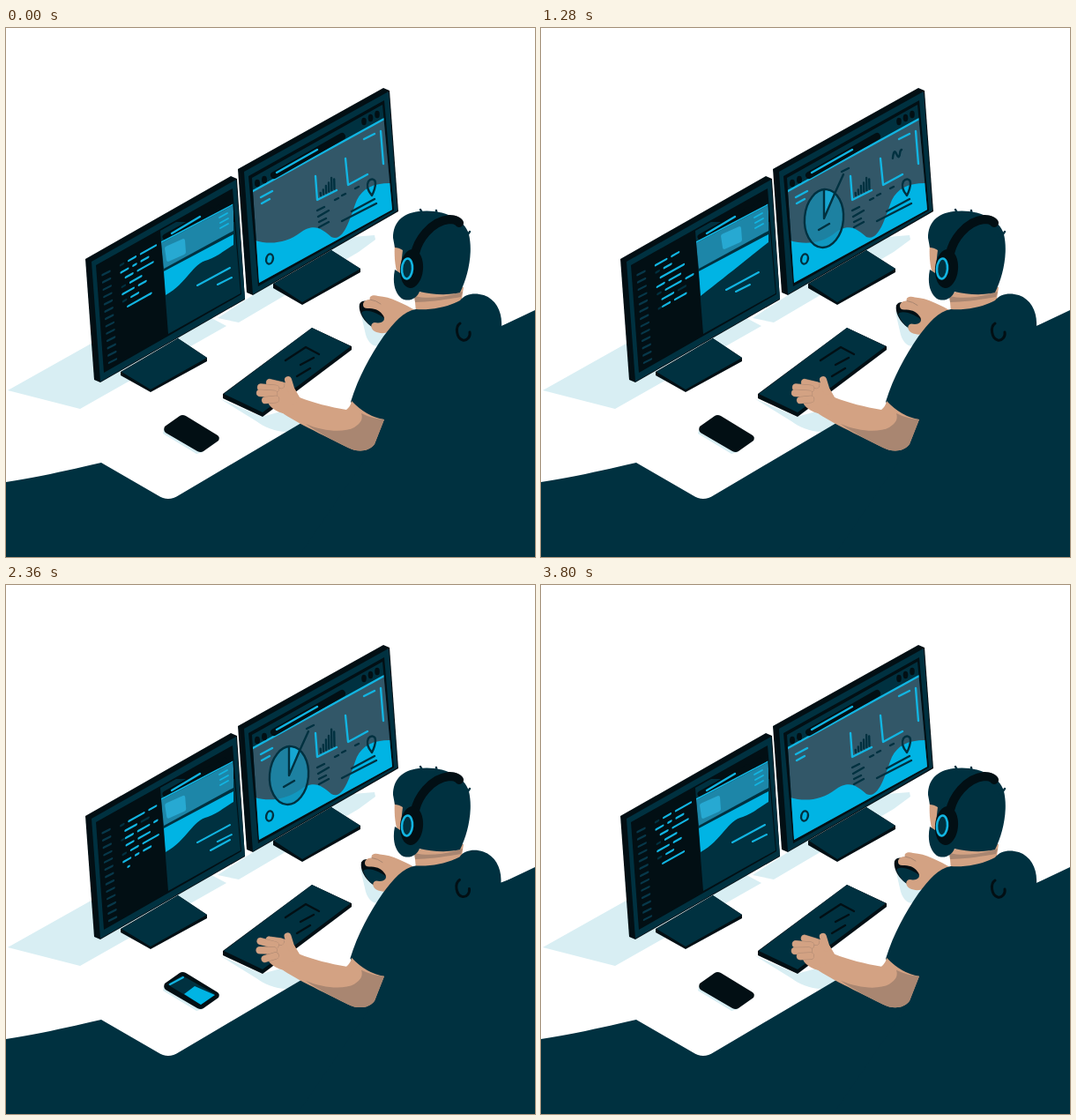
Animation of 600 by 600 pixels, one loop 3840 ms. Source, as an HTML page:

```html
<!DOCTYPE html>
<html lang="en">
<head>
<meta charset="utf-8">
<title>Working at two screens</title>
<style>
html, body { margin: 0; width: 100%; height: 100%; overflow: hidden; background: #fff; }
svg { display: block; width: 100vw; height: 100vh; }
.navy { fill: #003140; }
.ink { fill: #020f14; }
.cyan { fill: #00b4e4; }
.shade { fill: #d8eef3; }
.skin { fill: #d3a283; }
.brown { fill: #a98671; }
.ln { fill: none; stroke-width: 2.4; stroke-linecap: round; stroke-linejoin: round; }
.sc { stroke: #12b5e2; }
.sn { stroke: #003140; }
.si { stroke: #020f14; }
</style>
</head>
<body>
<svg viewBox="0 0 600 600" xmlns="http://www.w3.org/2000/svg">
  <defs>
    <clipPath id="editClip"><path d="M103 270L175 230L184 347L112 388Z"/></clipPath>
    <clipPath id="webClip"><path d="M175 230L256 185L266 301L184 347Z"/></clipPath>
    <clipPath id="dashClip"><path d="M279 170L427 87L438 206L287 289Z"/></clipPath>
  </defs>
  <rect width="600" height="600" fill="#fff"/>

  <!-- soft shadows -->
  <path class="shade" d="M2 411L100 356L220 322L250 338L84 432Z"/>
  <path class="shade" d="M240 329L380 238L418 235L419 240L400 254L264 334Z"/>
  <path class="shade" d="M242 420L290 441L330 430L350 448L318 458C305 458 292 452 284 446Z"/>
  <path class="shade" d="M402 322L408 348C412 360 420 364 428 358L436 338Z"/>
  <path class="shade" d="M179 455L178 460L216 483L224 481Z"/>

  <!-- left screen -->
  <path class="ink" d="M130 390L195 352L228 374L228 378L164 413L130 394Z"/>
  <path class="navy" d="M131 390L195 352L228 374L164 410Z"/>
  <path class="ink" d="M90 262L255 168L262 171L271 308L107 402L100 399Z"/>
  <path class="navy" d="M97 265L261 172L271 307L107 401Z"/>
  <path class="ink" d="M102 269L257 182L267 302L111 391Z"/>
  <g clip-path="url(#editClip)">
    <g id="gutter" class="ln" stroke="#07384a"></g>
    <g id="code" class="ln"></g>
  </g>
  <g clip-path="url(#webClip)">
    <path class="navy" d="M170 220H275V360H170Z"/>
    <path class="ln si" stroke-width="7" style="stroke-width:7" d="M181 237L234 207"/>
    <path class="ln sc" d="M188 233L220 214"/>
    <path class="ln si" style="stroke-width:5" d="M241 203V205M248 198V200"/>
    <path d="M176 244L258 201V230L179 273Z" fill="#1d86a8"/>
    <path class="ln sc" style="stroke-width:1.6" d="M176 243L258 200"/>
    <path id="card" d="M183 247L201 239Q203 239 203 241L204 254Q204 256 202 257L184 265Q182 265 182 263L180 250Q180 248 183 247Z" fill="#27a9d2"/>
    <path class="ln sc" style="stroke-width:1.8" d="M242 215L251 210M243 221L252 216M243 227L252 222"/>
    <path class="cyan" id="hill"/>
    <path id="notes" class="ln sc" style="stroke-width:2"/>
  </g>

  <!-- right screen -->
  <path class="ink" d="M303 290L369 252L402 273L402 277L336 314L303 295Z"/>
  <path class="navy" d="M304 290L369 252L402 273L336 311Z"/>
  <path class="ink" d="M263 160L428 68L435 71L445 208L280 303L273 300Z"/>
  <path class="navy" d="M270 163L434 72L444 207L280 302Z"/>
  <path class="ink" d="M275 168L429 82L440 207L286 293Z"/>
  <g clip-path="url(#dashClip)">
    <path class="navy" d="M270 80H445V300H270Z"/>
    <path d="M280 185L429 103L445 220L288 300Z" fill="#325768"/>
    <path class="ln sc" d="M280 185L429 103"/>
    <path class="ln si" style="stroke-width:8" d="M304 167L381 123"/>
    <path class="ln sc" d="M307 164L353 138"/>
    <g class="ink">
      <ellipse cx="285" cy="176" rx="3" ry="4.3"/><ellipse cx="293" cy="172" rx="3" ry="4.3"/>
      <ellipse cx="406" cy="106" rx="2.8" ry="4.2"/><ellipse cx="413.500" cy="102" rx="2.8" ry="4.2"/><ellipse cx="421" cy="98" rx="2.8" ry="4.2"/>
    </g>
    <path class="cyan" id="wave"/>
    <path class="ln sc" d="M289 192L302 185M290 199L299 194M406 126L418 120M425 117L428 154M351 168L353 195L375 184M385 148L388 178L410 166"/>
    <path class="ln sn" d="M353 207L361 203M354 214L366 207M355 220L363 216M355 226L366 220M373 195L377 193M381 190L385 188M396 182L400 180M392 208L418 194M381 219L420 199"/>
    <path class="ln sn" d="M415 190C410 184 409 178 411 174C414 170 419 171 419 176C419 181 417 186 415 190Z"/>
    <ellipse class="ln sn" cx="299" cy="262" rx="3.8" ry="5.7" transform="rotate(12 299 262)"/>
    <path id="bars" class="ln sn"/>
    <path id="graph" class="ln sn" pathLength="1" d="M392 158C391 165 395 170 397 165C399 160 398 148 400 142C402 136 404 148 406 146C408 144 406 139 409 138"/>
    <g id="pie">
      <ellipse rx="22" ry="33" transform="rotate(5)" fill="#168fb4" fill-opacity=".75"/>
      <path d="M0 0V-33Q7 -32 12 -28Z" fill="#16a7d3"/>
      <g class="ln sn">
        <ellipse rx="22" ry="33" transform="rotate(5)"/>
        <path d="M0 -33V0L12 -28M-6 13L6 6"/>
      </g>
    </g>
    <path id="needle" class="ln sn"/>
    <path id="label" class="ln sn"/>
  </g>

  <!-- keyboard and phone -->
  <path class="ink" d="M246 415L347 340L392 361V365L291 441L246 420Z"/>
  <path class="navy" d="M247 415L347 340L391 361L291 436Z"/>
  <path class="ln si" d="M317 377L340 362L355 370M334 382L349 374M330 395L345 386"/>
  <g id="phone">
    <path class="ink" d="M180 452L197 440Q200 438 204 440L240 462Q243 464 241 468L224 480Q221 482 217 480L181 459Q178 456 180 452Z"/>
    <g id="display">
      <path class="navy" d="M183 453L200 443L237 464L221 476Z"/>
      <path class="cyan" d="M202 464L214 455L237 465L221 476Z"/>
      <path class="ln sc" style="stroke-width:2" d="M186 453L201 445"/>
    </g>
  </g>

  <path class="navy" d="M0 515C45 508 72 501 108 493L172 530Q184 538 196 530L340 445L420 440L562 338L600 320V600H0Z"/>

  <!-- mouse hand -->
  <g id="mouse">
    <path class="ink" d="M401 313C405 305 420 311 430 325C434 336 428 344 419 341C407 336 399 322 401 313Z"/>
    <path class="navy" d="M403 323C407 317 424 324 430 330C432 339 426 344 419 341C411 337 406 330 403 323Z"/>
    <path class="skin" d="M405 314C405 309 410 308 413 308C411 304 417 302 422 304C437 305 449 312 468 322L440 341C434 346 426 348 418 344C413 341 413 335 418 334C427 336 432 331 427 325C423 319 417 318 410 318Q405 318 405 314Z"/>
    <path class="ln" stroke="#a98671" style="stroke-width:1" d="M413 308Q420 309 425 313"/>
  </g>

  <!-- neck and shirt -->
  <path class="skin" d="M463 300L519 294L516 314L490 325L465 322Z"/>
  <path class="brown" d="M463 304C480 308 500 305 518 299L516 305C500 308 480 311 464 311Z"/>
  <g id="shirt">
    <path class="navy" d="M465 319C451 321 440 334 428 350C413 372 400 395 391 424C397 434 412 442 429 445L415 478L330 602H602V324L562 338C563 322 556 308 542 303C532 300 521 301 515 309C500 317 482 320 465 319Z"/>
    <path class="ln si" style="stroke-width:3" d="M515 335C509 339 511 352 518 354C523 355 527 350 526 345"/>
  </g>

  <!-- keyboard arm -->
  <g id="arm">
    <path class="skin" d="M308 432C318 442 350 457 388 476C400 482 412 480 418 472L429 444Q409 441 392 423Q391 429 386 433C368 430 348 425 333 419L326 408Z"/>
    <path class="brown" d="M340 449C360 458 384 459 395 453C403 448 405 443 403 437Q415 443 429 444L418 472C412 480 400 482 388 476C370 467 354 459 340 449Z"/>
  </g>
  <g id="hand">
    <path class="skin" d="M299 405C308 399 319 400 328 410L334 421L314 437C303 434 295 427 296 418Z"/>
    <g id="fingers" fill="none" stroke-linecap="round"></g>
    <path class="ln" stroke="#d3a283" style="stroke-width:8" d="M324 412L320 399"/>
  </g>

  <!-- head -->
  <path class="skin" d="M441 244L450 240L458 285L447 285C441 276 440 258 441 244Z"/>
  <path class="navy" d="M439 238C439 220 450 210 468 208C490 205 519 213 525 234C530 255 524 282 515 300C500 304 482 302 469 299C466 307 457 311 449 307C441 301 438 289 441 274L447 278L450 252C447 250 444 249 441 249Z"/>
  <path class="ln sn" d="M470 206Q473 212 478 214M488 207Q489 212 487 216M515 236Q523 237 526 231"/>
  <path class="ln si" style="stroke-width:10" d="M463 262C465 240 483 219 503 217Q511 217 514 221"/>
  <ellipse class="ink" cx="460" cy="273" rx="13" ry="22" transform="rotate(5 460 273)"/>
  <ellipse class="ln sc" cx="455" cy="273" rx="6" ry="11.500" transform="rotate(4 455 273)" style="fill:#003140;stroke-width:2.6"/>
</svg>
<script>
const LOOP = 3840, ROW = 8.2, STEP = 320;
const CODE = [" aaaaaa", "aa aaa", "n aaaa aa", " aaa nn", "naa aaa a", " aa aaa",
  "n aa aaaa", "aa a aa", " aa aaaa", "n aaa", "aaa aa", "n aa"];
const FINGERS = [[312, 405, 299, 402], [306, 409, 289, 406], [304, 415, 288, 415], [306, 421, 294, 423]];

const $ = id => document.getElementById(id);
const set = (id, name, value) => $(id).setAttribute(name, value);
const mix = (a, b, k) => a + (b - a) * k;
const ramp = (t, a, b) => {
  const k = Math.min(1, Math.max(0, (t - a) / (b - a)));
  return k * k * (3 - 2 * k);
};
const pulse = (t, a, b, c, d) => ramp(t, a, b) * (1 - ramp(t, c, d));
const line = (x, y, dx, dy) => `M${x} ${y}l${dx} ${dy}`;
const blend = (a, b, k) => a.map((v, i) => mix(v, b[i], k).toFixed(2)).join(" ");

function drawCode(t) {
  const p = (t + STEP * 0.75) / STEP, n = Math.floor(p), typed = p - n;
  const lift = (1 - ramp(typed, 0, 0.25)) * ROW;
  let rows = "", marks = "";
  for (let i = 0; i < 7; i++) {
    const text = CODE[(n - 6 + i + 12) % 12], y = i * ROW + lift;
    const limit = i === 6 ? typed * 45 : 99;
    for (const run of text.matchAll(/a+|n+/g)) {
      const x = run.index * 4.6, end = Math.min(limit, x + run[0].length * 4.6 - 1.5);
      if (end > x) rows += `<path class="${run[0][0] === "a" ? "sc" : "sn"}" d="M${x} ${y}H${end}"/>`;
    }
  }
  for (let i = 0; i < 13; i++) marks += `M0 ${i * 8.3 + lift * 0.3}h8`;
  $("code").innerHTML = rows;
  $("gutter").innerHTML = `<path d="${marks}"/>`;
}

function drawSite(t) {
  const h = t % 1920, m = pulse(h, 420, 780, 1300, 1470);
  set("card", "transform", `translate(${24 * m} ${-14 * m})`);
  set("hill", "d", "M179 276L258 234V" + mix(246, 243, m) + "C" +
    blend([244, 255, 238, 260, 229, 263], [248, 251, 240, 257, 229, 266], m) + "C" +
    blend([211, 267, 206, 289, 181, 303], [214, 278, 200, 289, 181, 304], m) + "Z");
  const grow = pulse(t, 1500, 1850, 3000, 3350);
  set("notes", "d", line(mix(217, 210, m), mix(292, 297, m), 37, -20) +
    line(mix(240, 221, m), mix(291, 299, m), 16, -8) +
    (grow > 0.02 ? line(232, 301, 22 * grow, -12 * grow) : ""));
}

function drawDash(t) {
  const h = t % 1920, sway = Math.sin(2 * Math.PI * t / 1920);
  set("wave", "d", `M282 241C300 246 318 ${244 - sway} 334 232C350 221 358 228 369 237` +
    `C384 ${244 + sway} 391 212 398 195C405 181 418 175 440 176V215L286 300Z`);

  const size = pulse(t, 360, 700, 3200, 3600);
  set("pie", "transform", `translate(321 216) scale(${size})`);
  set("pie", "visibility", size > 0.02 ? "visible" : "hidden");
  const n = pulse(t, 620, 860, 2760, 3150);
  set("needle", "d", n > 0.02 ? line(333, 188, 10 * n, -22 * n) : "");
  const w = pulse(t, 840, 1120, 2400, 2720);
  set("label", "d", w > 0.01 ? line(341, 163, 8 * w, -4 * w) : "");

  const tall = 1 + 0.45 * pulse(t, 1400, 1880, 2650, 3250) + 0.18 * pulse(t, 80, 280, 420, 700);
  set("bars", "d", [3, 5, 8, 10, 14, 11].map((v, i) =>
    line(357 + 3.1 * i, 190 - 1.5 * i, -0.3, -v * tall)).join(""));

  const head = ramp(h, 480, 1280), tail = ramp(h, 940, 1580), len = head - tail;
  set("graph", "stroke-dasharray", `${Math.max(0, len)} 2`);
  set("graph", "stroke-dashoffset", -tail);
  set("graph", "visibility", len > 0.01 ? "visible" : "hidden");
}

function drawPerson(t) {
  const go = pulse(t, 200, 820, 1000, 1240), rest = pulse(t, 900, 1240, 2760, 3320);
  set("mouse", "transform", `translate(${4 * go + 2 * rest} ${go + 1.5 * rest})`);
  const up = pulse(t, 100, 800, 1000, 1300) + 0.6 * pulse(t, 2000, 2300, 2500, 2800);
  set("shirt", "transform", `translate(${-up} ${-up})`);

  const beat = 2 * Math.PI * t / STEP;
  set("hand", "transform", `translate(${0.5 * Math.sin(beat / 2)} ${0.6 * Math.sin(beat / 2)})`);
  set("arm", "transform", `translate(0 ${0.4 * Math.sin(beat / 2)})`);
  const paths = FINGERS.map(([x, y, u, v], i) =>
    `M${x} ${y}L${u} ${v + 1.6 * Math.sin(beat + i * 1.9)}`);
  $("fingers").innerHTML = paths.map(d =>
    `<path d="${d}" stroke="#a98671" stroke-width="8.4"/><path d="${d}" stroke="#d3a283" stroke-width="7.4"/>`).join("");
}

function drawPhone(t) {
  const buzz = t > 1560 && t < 1840 ? Math.sin(t / 18) : 0;
  set("phone", "transform", `translate(${buzz} ${buzz * 0.5})`);
  set("display", "opacity", pulse(t, 1560, 1680, 3560, 3680));
}

function draw(t) {
  drawCode(t);
  drawSite(t);
  drawDash(t);
  drawPerson(t);
  drawPhone(t);
}

set("code", "transform", "matrix(1 -.56 .075 1 130 269)");
set("gutter", "transform", "matrix(1 -.5 .075 1 109.5 280)");

const start = performance.now();
function tick() {
  draw((performance.now() - start) % LOOP);
  requestAnimationFrame(tick);
}
tick();
</script>
</body>
</html>
```
